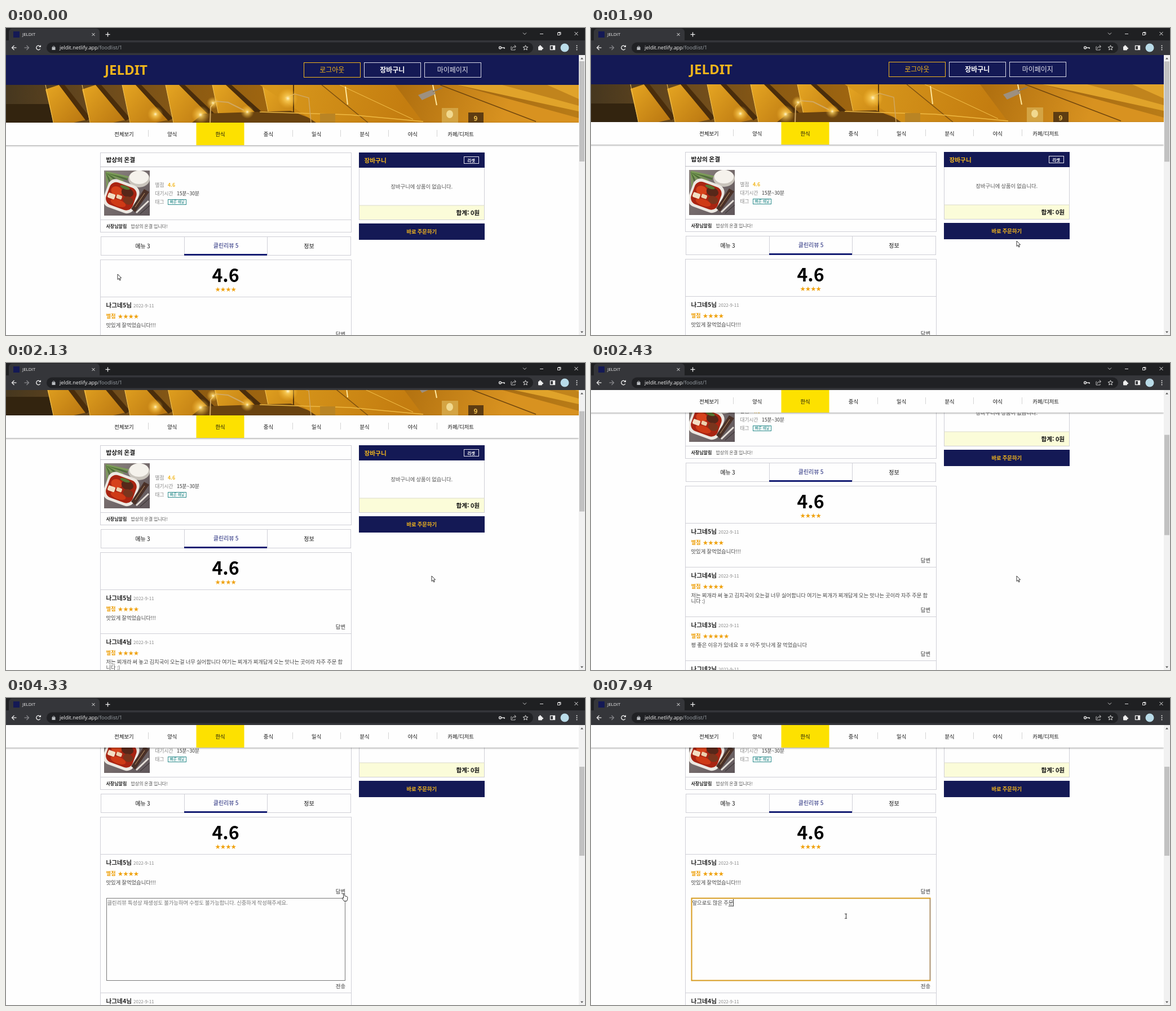
An HTML page with a canvas for the animation above (8000 ms loop, 1027x545 px).

```html
<!DOCTYPE html>
<html lang="ko">
<head>
<meta charset="utf-8">
<title>JELDIT</title>
<style>
html, body { margin: 0; width: 100%; height: 100%; overflow: hidden; background: #fefefe; }
canvas { display: block; }
</style>
</head>
<body>
<canvas id="stage" width="1027" height="545"></canvas>
<script>
const ctx = document.getElementById('stage').getContext('2d');
const LOOP = 8000, VIEW_TOP = 48, PAGE_W = 1016, MAX_SCROLL = 200;
const OPEN_AT = 4270, FOCUS_AT = 4940, TYPE_AT = 5115, KEY_MS = 128, FORM_H = 168;
const KR = '"Noto Sans CJK KR", "Noto Sans KR", "Noto Sans CJK", "Noto Sans CJK JP", sans-serif';
const UI = '"Open Sans", "Noto Sans", sans-serif';
const NAVY = '#141955', AMBER = '#f3b61c', STAR = '#efa10c', LINE = '#cfcfd6', INK = '#111';

const SHOP = '밥상의 온결';
const MENU = ['전체보기', '양식', '한식', '중식', '일식', '분식', '야식', '카페/디저트'];
const REVIEWS = [
  { id: 5, stars: 4, lines: ['맛있게 잘먹었습니다!!!'] },
  { id: 4, stars: 4, lines: ['저는 찌개라 써 놓고 김치국이 오는걸 너무 싫어함니다 여기는 찌개가 찌개답게 오는 맛나는 곳이라 자주 주문 합', '니다 :)'] },
  { id: 3, stars: 5, lines: ['평 좋은 이유가 있네요 ㅎㅎ 아주 맛나게 잘 먹었습니다'] },
  { id: 2, stars: 4, lines: [] }
];
// Each entry is the field's content after one more key.
const TYPED = [
  ...['ㅇ', '아', '앞', '앞ㅇ', '앞으', '앞을', '앞으로', '앞으롣', '앞으로도', '앞으로도 '],
  ...['ㅁ', '마', '만', '많', '많ㅇ', '많으', '많은', '많은 '].map(s => '앞으로도 ' + s),
  ...['ㅈ', '주', '줌', '주무', '주문'].map(s => '앞으로도 많은 ' + s)
];
const POINTER = [
  [250, 198, 437], [1550, 755, 378], [2600, 755, 378], [2970, 632, 351],
  [3200, 600, 347], [4400, 600, 347], [4900, 452, 387]
];

const clamp = v => Math.min(1, Math.max(0, v));
const smooth = v => { v = clamp(v); return v * v * (3 - 2 * v); };

function rect(x, y, w, h, color) {
  ctx.fillStyle = color;
  ctx.fillRect(x, y, w, h);
}
function frame(x, y, w, h, color, width = 1) {
  ctx.strokeStyle = color;
  ctx.lineWidth = width;
  ctx.strokeRect(x + .5, y + .5, w - 1, h - 1);
}
function trace(points, closed) {
  ctx.beginPath();
  for (let i = 0; i < points.length; i += 2) ctx.lineTo(points[i], points[i + 1]);
  if (closed) ctx.closePath();
}
function poly(color, ...points) {
  trace(points, true);
  ctx.fillStyle = color;
  ctx.fill();
}
function stroke(color, width, ...points) {
  trace(points);
  ctx.strokeStyle = color;
  ctx.lineWidth = width;
  ctx.stroke();
}
function oval(x, y, rx, ry, color, angle = 0) {
  ctx.beginPath();
  ctx.ellipse(x, y, rx, ry, angle, 0, 7);
  ctx.fillStyle = color;
  ctx.fill();
}
function ring(x, y, r, color, width, from = 0, to = 7) {
  ctx.beginPath();
  ctx.arc(x, y, r, from, to);
  ctx.strokeStyle = color;
  ctx.lineWidth = width;
  ctx.stroke();
}
function pill(x, y, w, h, r, color) {
  ctx.beginPath();
  ctx.roundRect(x, y, w, h, r);
  ctx.fillStyle = color;
  ctx.fill();
}
// y is the optical middle of the glyphs.
function text(str, x, y, size, color, { weight = 400, align = 'left', font = KR } = {}) {
  ctx.font = `${weight} ${size}px ${font}`;
  ctx.textAlign = align;
  ctx.fillStyle = color;
  ctx.fillText(str, x, y + size * .37);
  return ctx.measureText(str).width;
}
const BOLD = { weight: 700 }, MID = { align: 'center' }, BOLD_MID = { weight: 700, align: 'center' };

function gradient(x0, y0, x1, y1, ...colors) {
  const g = ctx.createLinearGradient(x0, y0, x1, y1);
  colors.forEach((c, i) => g.addColorStop(i / (colors.length - 1), c));
  return g;
}
function glow(x, y, r) {
  const g = ctx.createRadialGradient(x, y, 0, x, y, r);
  g.addColorStop(0, '#fff6cf');
  g.addColorStop(.25, 'rgba(255,214,100,.75)');
  g.addColorStop(1, 'rgba(255,190,50,0)');
  rect(x - r, y - r, 2 * r, 2 * r, g);
}

function drawBanner() {
  ctx.save();
  ctx.beginPath();
  ctx.rect(0, 101, PAGE_W, 67);
  ctx.clip();
  rect(0, 101, PAGE_W, 67, gradient(0, 0, PAGE_W, 0, '#46371f', '#6b4a1d', '#8d5b12', '#a5690f', '#b87a12', '#a56a12', '#b97c17'));
  rect(0, 135, 90, 33, '#33240f');
  for (let i = 0; i < 6; i++) {
    const x = 70 + i * 62 + i * i * 3, w = 72 + i * 5;
    poly(gradient(x, 101, x + w, 168, '#e6a622', '#b87510'), x, 101 + (i < 2 ? 8 : 0), x + 24, 101, x + w, 163, x + w - 22, 168, x + 14, 168);
    poly('#4a2d0b', x + 24, 101, x + 34, 101, x + w + 8, 160, x + w, 165);
    stroke('#f4c759', 1, x, 101, x + 14, 168);
  }
  poly('#6a430f', 330, 168, 350, 152, 505, 147, 560, 168);
  poly(gradient(480, 101, 700, 168, '#d8981c', '#c47d10'), 450, 101, 720, 101, 760, 168, 550, 168);
  poly(gradient(690, 101, 880, 168, '#ad6d0e', '#d89220'), 690, 101, 800, 101, 1016, 160, 1016, 168, 740, 168);
  poly('#e0a32a', 800, 101, 1016, 101, 1016, 148);
  poly('#c1841c', 880, 101, 960, 101, 1016, 126, 1016, 138);
  stroke('#593709', 2, 510, 101, 510, 152);
  stroke('#7d500f', 1.5, 560, 101, 642, 168);
  stroke('#f3c04b', 1, 592, 101, 722, 162);
  stroke('#70460d', 1.5, 770, 101, 940, 166);
  stroke('#efb943', 1.5, 450, 149, 610, 154, 740, 166);
  stroke('#ffe9a0', 2, 602, 104, 606, 136);
  stroke('#ffe9a0', 2, 757, 101, 764, 137);
  stroke('#d1a862', 2, 362, 168, 363, 140, 372, 130, 394, 132, 422, 146);
  stroke('#d1a862', 1.5, 495, 124, 512, 117, 537, 124, 541, 168);
  poly('#9d9080', 731, 119, 757, 109, 762, 117, 738, 128);
  stroke('#8d7b60', 2, 757, 113, 774, 106);
  rect(557, 152, 27, 16, '#b98424');
  rect(773, 142, 29, 26, '#d4a443');
  oval(787, 153, 6, 7, '#f1d98f');
  rect(820, 150, 27, 18, '#5d3c12');
  text('9', 833, 161, 12, '#f0c050', BOLD_MID);
  [[265, 153, 14], [345, 154, 16], [367, 133, 11], [428, 149, 12], [500, 125, 18]].forEach(p => glow(...p));
  ctx.restore();
}

function drawDish() {
  ctx.save();
  ctx.beginPath();
  ctx.rect(174, 253, 81, 80);
  ctx.clip();
  rect(174, 253, 81, 80, gradient(174, 253, 255, 333, '#8c8580', '#746a6b', '#5f565a'));
  for (let i = 0; i < 7; i++) stroke(i % 2 ? '#4f7138' : '#7c9b58', 3, 178, 256, 180 + i * 7, 284 - i * 3);
  oval(236, 268, 19, 15, '#c9c4bc');
  oval(236, 265, 17, 12, '#f5f2ec');
  ctx.translate(205, 300);
  ctx.rotate(.35);
  pill(-30, -27, 58, 52, 14, '#ece8e2');
  pill(-26, -22, 50, 42, 12, '#a92412');
  oval(-12, -7, 10, 8, '#d6421c');
  oval(7, -11, 11, 8, '#572719');
  oval(13, 2, 9, 7, '#7a351d');
  oval(-2, 12, 14, 6, '#cf3a16');
  pill(-24, 0, 13, 9, 2, '#f3dfc4');
  pill(-9, -2, 10, 7, 2, '#ecd0ad');
  oval(0, -18, 9, 3, '#567632');
  ctx.restore();
  poly('#4a3128', 222, 321, 245, 286, 254, 291, 229, 327);
  stroke('#c69a6a', 1, 229, 318, 246, 293);
  stroke('#e5dfd8', 3, 231, 328, 253, 307);
  stroke('#2e2928', 1, 238, 330, 255, 315);
}

function drawHeader() {
  rect(0, 48, PAGE_W, 53, NAVY);
  const face = '900 extra-condensed 34px "Noto Sans", sans-serif';
  ctx.font = face;
  const size = Math.min(34, 34 * 76 / ctx.measureText('JELDIT').width);
  ctx.font = face.replace('34', size);
  ctx.textAlign = 'left';
  ctx.fillStyle = AMBER;
  ctx.fillText('JELDIT', 175, 74.5 + size * .357);
  [['로그아웃', AMBER, 400], ['장바구니', '#fff', 700], ['마이페이지', '#e3e3ec', 400]].forEach(([label, color, weight], i) => {
    frame(528 + i * 107, 61, 101, 27, i ? '#d9d9e6' : AMBER);
    text(label, 578.3 + i * 107, 75, 12, color, { weight, align: 'center' });
  });
}

function drawShop() {
  frame(167, 221, 446, 142, LINE);
  rect(167, 246, 445, 1, '#bdbdc4');
  text(SHOP, 177.5, 234.5, 10.67, INK, BOLD);
  drawDish();
  ['별점', '대기시간', '태그'].forEach((s, i) => text(s, 264.5, 278.5 + i * 15.2, 8.67, '#888'));
  text('4.6', 287, 278.5, 8.67, AMBER, BOLD);
  text('15분~30분', 303, 293.5, 8.67, '#333');
  frame(287, 304, 33, 10, '#2a8c8c');
  text('빠른 배달', 303.7, 309, 6.67, '#168080', MID);
  rect(167, 340, 445, 1, LINE);
  text('사장님알림', 177.5, 352, 8, '#222', BOLD);
  text(SHOP + ' 입니다!', 221.5, 352, 8, '#555');

  frame(168, 370, 444, 34, LINE);
  rect(316, 370, 1, 34, LINE);
  rect(463, 370, 1, 34, LINE);
  rect(316, 401, 147, 3, '#151d73');
  text('메뉴 3', 242.5, 387, 10, INK, MID);
  text('클린리뷰 5', 390, 386.3, 10, '#1c2478', MID);
  text('정보', 537.5, 387, 10, INK, MID);
}

function drawCart() {
  frame(626, 221, 223, 120, LINE);
  rect(626, 221, 223, 27, NAVY);
  text('장바구니', 635.5, 235, 10.67, AMBER, BOLD);
  frame(812, 228, 27, 13, '#e6e6f0');
  text('리셋', 825.3, 234.8, 7.33, '#fff', BOLD_MID);
  text('장바구니에 상품이 없습니다.', 737.3, 282, 9.33, '#555', MID);
  rect(627, 315, 221, 25, '#fbfcd9');
  rect(626, 314.5, 223, 1, '#dcdccb');
  text('합계: 0원', 840, 328, 10.67, INK, { weight: 700, align: 'right' });
  rect(626, 347, 223, 29, NAVY);
  text('바로 주문하기', 737.3, 362, 9.33, AMBER, BOLD_MID);
}

function drawForm(t) {
  if (t < FOCUS_AT) frame(178, 555, 424, 147, '#777');
  else {
    frame(178, 555, 424, 147, '#d79b1e', 2);
    rect(601, 557, 1, 143, '#8d89a8');
  }
  const count = Math.min(TYPED.length, Math.floor((t - TYPE_AT) / KEY_MS) + 1);
  const value = count > 0 ? TYPED[count - 1] : '';
  const width = text(value || '클린리뷰 특성상 재생성도 불가능하며 수정도 불가능합니다. 신중하게 작성해주세요.',
    179.5, 563.7, 9.33, value ? '#444' : '#757575');
  if (t >= FOCUS_AT) {
    const caret = 179.5 + (value ? width : 0);
    if (value && !value.endsWith(' ')) {
      const last = ctx.measureText(value.slice(-1)).width;
      rect(caret - last, 569, last, 1, '#555');
    }
    rect(Math.round(caret), 557, 1, 13, '#333');
  }
  text('전송', 602, 712, 9.33, '#777', { weight: 700, align: 'right' });
}

function drawReviews(t) {
  const open = t >= OPEN_AT;
  rect(167, 411, 446, 1, LINE);
  rect(167, 411, 1, 700, LINE);
  rect(612, 411, 1, 700, LINE);
  text('4.6', 389.5, 439, 32, '#000', BOLD_MID);
  text('★★★★', 389.7, 464, 9.33, STAR, MID);
  let y = 477;
  REVIEWS.forEach(({ id, stars, lines }, i) => {
    rect(167, y, 446, 1, LINE);
    text(`나그네${id}님`, 177.5, y + 15.3, 10.67, '#222', BOLD);
    text('2022-9-11', 226, y + 15.8, 8, '#888');
    text('별점', 177.5, y + 35, 9.33, STAR, BOLD);
    text('★'.repeat(stars), 198.3, y + 35, 9.33, STAR);
    lines.forEach((s, n) => text(s, 177.5, y + 51 + n * 9.3, 9.33, '#444'));
    const extra = lines.length > 1 ? 10 : 0;
    text('답변', 602, y + 66.5 + extra, 9.33, '#777', { weight: 700, align: 'right' });
    y += 78 + extra;
    if (!i && open) {
      drawForm(t);
      y += FORM_H;
    }
  });
}

function drawNav(top) {
  ctx.save();
  ctx.shadowColor = 'rgba(0,0,0,.4)';
  ctx.shadowBlur = 3;
  ctx.shadowOffsetY = 1;
  rect(-5, top, PAGE_W + 5, 40, '#fefefe');
  ctx.restore();
  const cell = 85.3;
  rect(337.5, top, 85, 40, '#fde100');
  MENU.forEach((label, i) => {
    if (i && i !== 2 && i !== 3) rect(Math.round(166.5 + i * cell), top + 13, 1, 12, '#d4d4d4');
    text(label, 209.5 + i * cell, top + 20.7, 9.33, INK, MID);
  });
}

function drawScrollbar(scroll, open) {
  rect(PAGE_W, VIEW_TOP, 11, 497, '#f1f1f1');
  const track = open ? 63 : 71;
  rect(1017, 59 + scroll / MAX_SCROLL * track, 9, open ? 158 : 178, '#c1c1c1');
  poly('#555', 1019, 55.5, 1024, 55.5, 1021.5, 52.5);
  poly('#555', 1019, 538.5, 1024, 538.5, 1021.5, 541.5);
}

function drawBrowser() {
  rect(0, 0, 1027, 23, '#1f2022');
  rect(0, 22, 1027, 26, '#35363a');
  pill(5, 1, 161, 26, [6, 6, 0, 0], '#35363a');
  rect(13, 6, 11, 11, NAVY);
  text('JELDIT', 29, 11, 8, '#eee', { font: UI });
  pill(72, 25.5, 863, 19, 9.5, '#202124');
  const host = 'jeldit.netlify.app';
  const w = text(host, 95, 35, 9.1, '#f1f1f1', { font: UI });
  text('/foodlist/1', 95 + w, 35, 9.1, '#9aa0a6', { font: UI });

  const cross = (x, y, r) => {
    stroke('#e8e8e8', 1, x - r, y - r, x + r, y + r);
    stroke('#e8e8e8', 1, x + r, y - r, x - r, y + r);
  };
  cross(155, 11.5, 2.5);
  cross(1011.5, 10, 3);
  stroke('#eee', 1.3, 176.5, 11.5, 184.5, 11.5);
  stroke('#eee', 1.3, 180.5, 7.5, 180.5, 15.5);
  stroke('#ccc', 1, 917, 8.5, 920, 11.5, 923, 8.5);
  rect(947, 10, 6, 1, '#ddd');
  frame(978, 8, 5, 5, '#ddd');
  stroke('#ddd', 1, 979.5, 7.5, 984, 7.5, 984, 12);

  const arrow = (x, d, color) => {
    stroke(color, 1.3, x - 4 * d, 35, x + 4 * d, 35);
    stroke(color, 1.3, x, 31, x + 4 * d, 35, x, 39);
  };
  arrow(14.5, -1, '#e8e8e8');
  arrow(36.5, 1, '#85868a');
  ring(57.5, 35, 3.7, '#e8e8e8', 1.4, .5, 5.6);
  poly('#e8e8e8', 58, 34, 62, 34, 62, 30);
  rect(81.5, 34, 6, 5, '#b8bbbf');
  ring(84.5, 34, 1.8, '#b8bbbf', 1, Math.PI, 0);

  ring(876.5, 35, 1.9, '#ddd', 1.5);
  stroke('#ddd', 1.6, 878.5, 35, 884, 35, 884, 37);
  stroke('#bbb', 1, 897, 33, 896, 33, 896, 39, 903, 39, 903, 37);
  stroke('#bbb', 1, 898, 37, 899, 34, 904, 33, 902, 30.5, 904.5, 33, 902, 35.5);
  const star = [];
  for (let i = 0; i < 11; i++) {
    const a = i * Math.PI / 5 - Math.PI / 2, r = i % 2 ? 2 : 4.6;
    star.push(921.5 + r * Math.cos(a), 35.3 + r * Math.sin(a));
  }
  stroke('#ddd', 1, ...star);
  pill(944, 32.5, 7, 7, 1, '#eee');
  oval(947.5, 32, 1.6, 1.6, '#eee');
  oval(951.5, 36, 1.6, 1.6, '#eee');
  frame(965, 31, 9, 8, '#eee', 1.3);
  rect(970, 31, 4, 8, '#eee');
  oval(991, 35, 7.5, 7.5, '#b9dbe8');
  [31.5, 35, 38.5].forEach(y => oval(1012.5, y, 1, 1, '#eee'));
}

function pointerAt(t) {
  let [, x, y] = POINTER[0];
  for (let i = 1; i < POINTER.length; i++) {
    const [t0, x0, y0] = POINTER[i - 1], [t1, x1, y1] = POINTER[i];
    if (t < t0) break;
    const k = smooth((t - t0) / (t1 - t0));
    x = x0 + (x1 - x0) * k;
    y = y0 + (y1 - y0) * k;
  }
  return [x, y];
}

function drawPointer(t) {
  const [x, y] = pointerAt(t);
  const overReply = t > 2970 && x > 584 && x < 603 && y < 349;
  const overField = t >= OPEN_AT && !overReply && y > 355;
  ctx.save();
  ctx.translate(x, y);
  ctx.lineJoin = 'round';
  if (overField) {
    stroke('#333', 1, -2, -4, 0, -3.5, 2, -4);
    stroke('#333', 1, .5, -4, .5, 4);
    stroke('#333', 1, -2, 4.5, 0, 4, 2, 4.5);
  } else {
    const shape = overReply
      ? [-1.5, 0, .5, 0, .8, 4.5, 5, 5.5, 6, 7, 5.5, 11, 4.5, 13.5, -.5, 13.5, -3.5, 9, -3, 7.5, -1.5, 8.5]
      : [0, 0, 0, 9.5, 2.2, 7.6, 3.8, 11, 5.2, 10.4, 3.7, 7, 6.6, 6.7];
    poly('#fff', ...shape);
    trace(shape, true);
    ctx.strokeStyle = '#222';
    ctx.lineWidth = .9;
    ctx.stroke();
  }
  ctx.restore();
}

function draw(t) {
  const scroll = Math.round(MAX_SCROLL * smooth((t - 1870) / 630));
  rect(0, 0, 1027, 545, '#fefefe');
  ctx.save();
  ctx.translate(0, -scroll);
  drawHeader();
  drawBanner();
  drawShop();
  drawCart();
  drawReviews(t);
  ctx.restore();
  drawNav(Math.max(168 - scroll, VIEW_TOP));
  drawScrollbar(scroll, t >= OPEN_AT);
  drawBrowser();
  drawPointer(t);
}

function tick() {
  draw(performance.now() % LOOP);
  requestAnimationFrame(tick);
}
tick();
</script>
</body>
</html>
```
